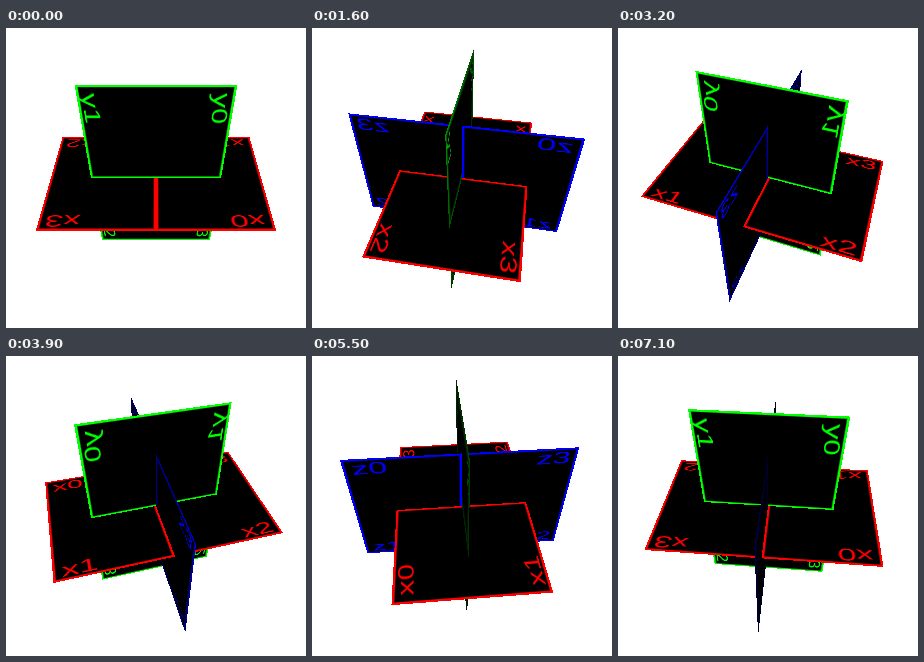
Animation, 300 px wide and 300 px high, one loop 7.2 s. Source, as an HTML page with a canvas:

```html
<!DOCTYPE html>
<html lang="en">
<head>
<meta charset="utf-8">
<title>Three golden rectangles</title>
<style>
  html, body { margin: 0; width: 100%; height: 100%; overflow: hidden; background: #fff; }
  canvas { display: block; width: 300px; height: 300px; }
</style>
</head>
<body>
<canvas id="stage" width="300" height="300"></canvas>
<script>
const SIZE = 300, STEPS = 72, STEP_MS = 100;
const LONG = (1 + Math.sqrt(5)) / 2;   // half length; half width is 1
const EYE = 4;                         // camera at (0, EYE, EYE), looking at the centre
const FOCAL = 65 * EYE * Math.SQRT2;
const BORDER = 0.033, STROKE = 0.042;
const TEX = 256;

const ctx = document.getElementById('stage').getContext('2d');
const image = ctx.createImageData(SIZE, SIZE);
const clamp = v => Math.max(0, Math.min(1, v));

// Square label sheet, later mapped onto the whole rectangle.
function makeLabels(letter) {
  const sheet = document.createElement('canvas');
  sheet.width = sheet.height = TEX;
  const g = sheet.getContext('2d');
  g.font = '36px "Liberation Sans", Arial, sans-serif';
  g.textAlign = 'center';
  [[28, 34], [28, 248], [230, 248], [230, 34]].forEach(([x, y], i) => g.fillText(letter + i, x, y));
  const data = g.getImageData(0, 0, TEX, TEX).data;
  return Float32Array.from({ length: TEX * TEX }, (_, i) => data[i * 4 + 3] / 255);
}
const labels = ['x', 'y', 'z'].map(makeLabels);

function sample(tex, u, v) {
  const x = Math.max(0, Math.min(TEX - 1.01, (0.5 - u / (2 * LONG)) * TEX - 0.5));
  const y = Math.max(0, Math.min(TEX - 1.01, (0.5 - v / 2) * TEX - 0.5));
  const x0 = x | 0, y0 = y | 0, fx = x - x0, fy = y - y0, p = y0 * TEX + x0;
  return (tex[p] * (1 - fx) + tex[p + 1] * fx) * (1 - fy) +
         (tex[p + TEX] * (1 - fx) + tex[p + TEX + 1] * fx) * fy;
}

// Brightness at a point; lines fade as one pixel covers more of the surface.
function brightness(tex, u, v, footprint) {
  const edge = Math.min(Math.abs(u), LONG - Math.abs(u), 1 - Math.abs(v));
  const line = clamp((Math.max(BORDER, footprint) - edge) / footprint + 0.5) *
               Math.min(1, BORDER / footprint);
  return Math.max(line, sample(tex, u, v) * Math.min(1, STROKE / footprint));
}

function render(angle) {
  const cos = Math.cos(angle), sin = Math.sin(angle);
  const toLocal = (x, y, z) => [x * cos - z * sin, y, x * sin + z * cos];
  const eye = toLocal(0, EYE, EYE);
  const px = image.data;
  for (let row = 0, p = 0; row < SIZE; row++) {
    const sy = (SIZE / 2 - row - 0.5) / FOCAL;
    for (let col = 0; col < SIZE; col++, p += 4) {
      const sx = (col + 0.5 - SIZE / 2) / FOCAL;
      const dir = toLocal(sx, (sy - 1) * Math.SQRT1_2, (-sy - 1) * Math.SQRT1_2);
      let near = Infinity, hit = -1, hitU = 0, hitV = 0;
      for (let i = 0; i < 3; i++) {
        const n = (i + 1) % 3, w = (i + 2) % 3;
        const t = -eye[n] / dir[n];
        if (!(t > 0 && t < near)) continue;
        const u = eye[i] + t * dir[i], v = eye[w] + t * dir[w];
        if (Math.abs(u) > LONG || Math.abs(v) > 1) continue;
        near = t; hit = i; hitU = u; hitV = v;
      }
      px[p] = px[p + 1] = px[p + 2] = hit < 0 ? 255 : 0;
      px[p + 3] = 255;
      if (hit < 0) continue;
      const facing = Math.abs(dir[(hit + 1) % 3]) / Math.hypot(...dir);
      px[p + hit] = 255 * brightness(labels[hit], hitU, hitV, near / (FOCAL * facing));
    }
  }
  ctx.putImageData(image, 0, 0);
}

let shown = -1;
function tick() {
  const step = Math.floor(performance.now() / STEP_MS) % STEPS;
  if (step !== shown) render((shown = step) / STEPS * 2 * Math.PI);
  requestAnimationFrame(tick);
}
tick();
</script>
</body>
</html>
```
